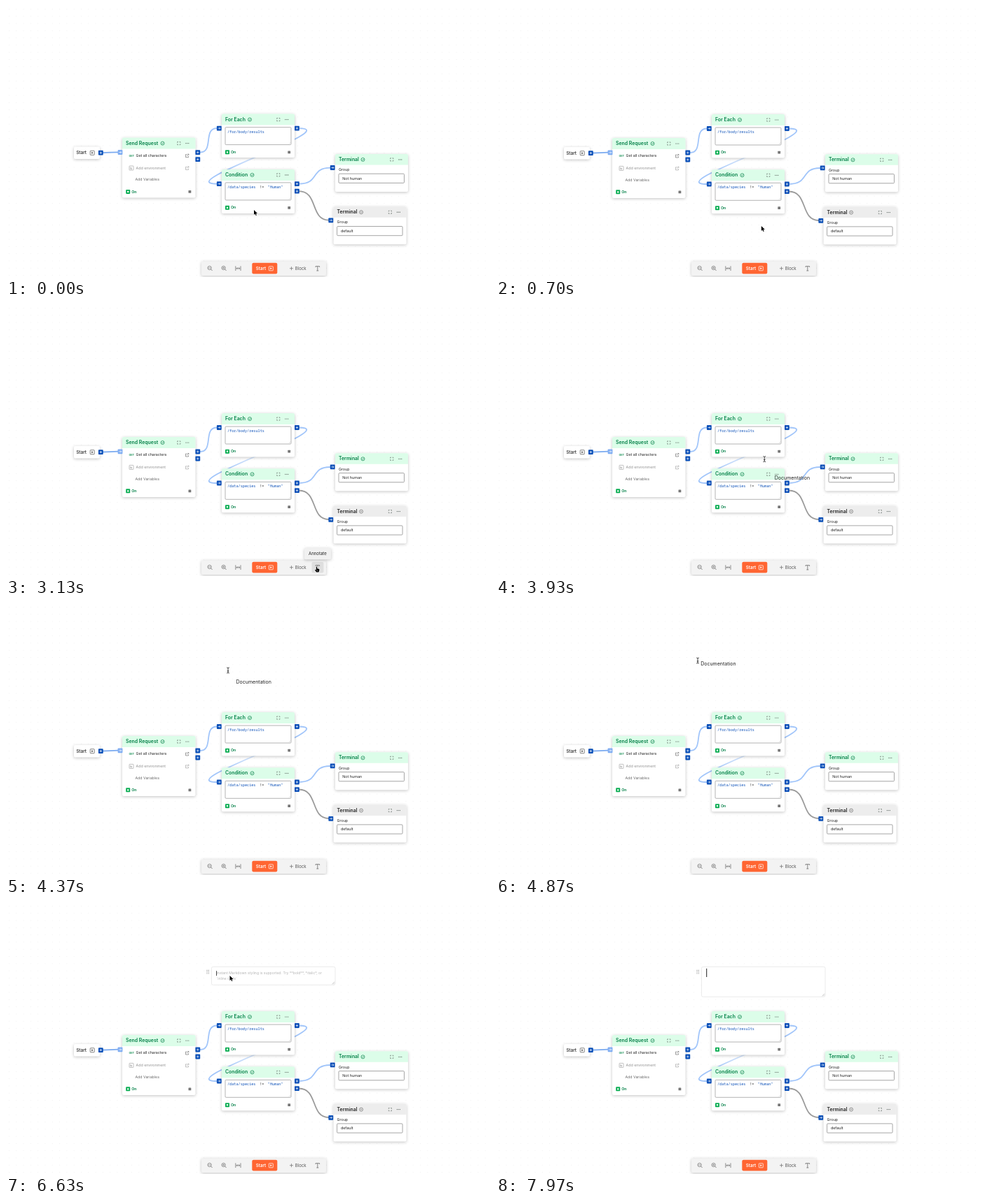
An HTML page with a canvas for the animation above (8 s loop, 691 by 388 pixels).

```html
<!DOCTYPE html>
<html lang="en">
<head>
<meta charset="utf-8">
<title>Flow editor</title>
<style>
html, body { margin: 0; width: 100%; height: 100%; overflow: hidden; background: #fff; }
canvas { display: block; width: 691px; height: 388px; }
</style>
</head>
<body>
<canvas id="stage"></canvas>
<script>
const W = 691, H = 388, LOOP = 8000;
const canvas = document.getElementById('stage');
const ctx = canvas.getContext('2d');
const dpr = window.devicePixelRatio || 1;
canvas.width = W * dpr;
canvas.height = H * dpr;

const SANS = 'Inter, "Open Sans", sans-serif';
const MONO = '"Noto Sans Mono", "DejaVu Sans Mono", monospace';
const GREEN = '#007f46', MINT = '#dcfde9', BLUE = '#0b50b8', LINK = '#a1c5fa';
const INK = '#212121', GRAY = '#6b6b6b';

// Times of the hard changes, in ms
const SETTLE = 400, HAND = 2260, TIP = 2560, PICK = 3380, PLACE = 5420, TYPE = 7700, HEADING = 7860;

// Pointer path: time, x, y
const path = [
  [0, 354, 292], [420, 354, 292], [900, 404, 338], [1350, 441, 371], [1870, 447, 373],
  [2300, 443.5, 374.5], [3400, 443.5, 374.5], [3750, 411, 280], [4170, 343, 141],
  [4370, 317, 95], [4600, 293, 79], [4870, 288, 81], [5120, 288, 88], [5480, 289, 90],
  [5950, 319.5, 104], [8000, 319.5, 104]
];

function slope(i, k) {
  const a = path[i - 1], p = path[i], b = path[i + 1];
  if (!a || !b) return 0;
  const before = p[k] - a[k], after = b[k] - p[k];
  return before * after <= 0 ? 0 : (b[k] - a[k]) / (b[0] - a[0]);
}

function pointerAt(t) {
  let i = 0;
  while (i < path.length - 2 && t > path[i + 1][0]) i++;
  const a = path[i], b = path[i + 1], d = b[0] - a[0];
  const s = Math.max(0, (t - a[0]) / d), s2 = s * s, s3 = s2 * s;
  return [1, 2].map(k =>
    (2 * s3 - 3 * s2 + 1) * a[k] + (s3 - 2 * s2 + s) * d * slope(i, k) +
    (3 * s2 - 2 * s3) * b[k] + (s3 - s2) * d * slope(i + 1, k));
}

function text(str, x, y, size, color = INK, weight = 400, family = SANS) {
  ctx.font = `${weight} ${size}px ${family}`;
  ctx.fillStyle = color;
  ctx.fillText(str, x, y);
}

function box(x, y, w, h, r, fill, line, width = 0.6) {
  ctx.beginPath();
  ctx.roundRect(x, y, w, h, r);
  if (fill) { ctx.fillStyle = fill; ctx.fill(); }
  if (line) { ctx.strokeStyle = line; ctx.lineWidth = width; ctx.stroke(); }
}

function shadowBox(x, y, w, h, r, fill) {
  ctx.save();
  ctx.shadowColor = 'rgba(0,0,0,.24)';
  ctx.shadowBlur = 4 * dpr;
  ctx.shadowOffsetY = dpr;
  box(x, y, w, h, r, fill);
  ctx.restore();
}

// Strokes a list of polylines given as flat coordinates
function lines(color, width, ...parts) {
  ctx.beginPath();
  for (const p of parts) {
    ctx.moveTo(p[0], p[1]);
    for (let i = 2; i < p.length; i += 2) ctx.lineTo(p[i], p[i + 1]);
  }
  ctx.strokeStyle = color;
  ctx.lineWidth = width;
  ctx.stroke();
}

function ring(x, y, r, color, width = 0.7) {
  ctx.beginPath();
  ctx.arc(x, y, r, 0, 7);
  ctx.strokeStyle = color;
  ctx.lineWidth = width;
  ctx.stroke();
}

function dot(x, y, r, color) {
  ctx.beginPath();
  ctx.arc(x, y, r, 0, 7);
  ctx.fillStyle = color;
  ctx.fill();
}

function wire(color, x1, y1, c1, c2, x2, y2) {
  ctx.beginPath();
  ctx.moveTo(x1, y1);
  ctx.bezierCurveTo(c1, y1, c2, y2, x2, y2);
  ctx.strokeStyle = color;
  ctx.lineWidth = 1.8;
  ctx.stroke();
}

function port(x, y, arrow, fill = BLUE) {
  box(x - 3.4, y - 3.4, 6.8, 6.8, 0.8, fill);
  if (arrow) lines('#fff', 0.7, [x - 1.8, y, x + 1.6, y], [x + 0.3, y - 1.4, x + 1.7, y, x + 0.3, y + 1.4]);
  else lines('#fff', 0.7, [x - 1.7, y, x + 1.7, y], [x, y - 1.7, x, y + 1.7]);
}

function playIcon(x, y, color) {
  box(x - 3, y - 3, 6, 6, 0.6, null, color, 0.7);
  ctx.beginPath();
  ctx.moveTo(x - 1, y - 1.5);
  ctx.lineTo(x + 1.5, y);
  ctx.lineTo(x - 1, y + 1.5);
  ctx.fillStyle = color;
  ctx.fill();
}

function expandIcon(x, y) {
  const parts = [];
  for (const sx of [-1, 1]) for (const sy of [-1, 1])
    parts.push([x + sx * 0.8, y + sy * 2.1, x + sx * 2.1, y + sy * 2.1, x + sx * 2.1, y + sy * 0.8]);
  lines('#667069', 0.7, ...parts);
}

function linkIcon(x, y, color) {
  lines(color, 0.65, [x, y - 1.8, x - 2, y - 1.8, x - 2, y + 2.2, x + 2, y + 2.2, x + 2, y + 0.4],
    [x - 0.3, y + 0.4, x + 2.4, y - 2.3], [x + 0.8, y - 2.4, x + 2.4, y - 2.4, x + 2.4, y - 0.8]);
}

function card(x, y, w, h, head, title, titleW, ok = true) {
  const cy = y + 8;
  shadowBox(x, y, w, h, 2, '#fff');
  box(x, y, w, head, [2, 2, 0, 0], ok ? MINT : '#ededed');
  text(title, x + 5, cy, 6.9, ok ? GREEN : INK, 600);
  const ix = x + titleW + 11.5, color = ok ? GREEN : GRAY;
  ring(ix, cy, 2.5, color);
  if (ok) lines(color, 0.7, [ix - 1.1, cy, ix - 0.2, cy + 0.9, ix + 1.3, cy - 0.9]);
  else lines(color, 0.7, [ix - 1.2, cy, ix + 1.2, cy]);
  expandIcon(x + 80.8, cy);
  for (const d of [-2, 0, 2]) dot(x + 92.8 + d, cy, 0.6, '#505a54');
}

function status(x, y) {
  box(x, y - 3, 6, 6, 0.8, '#0cae54');
  box(x + 1.9, y - 1.1, 2.2, 2.2, 0.3, '#fff');
  text('On', x + 8, y, 5.3, GREEN, 600);
  box(x + 89.3, y - 1.9, 3.8, 3.8, 0.5, '#777');
}

function codeBox(x, y) {
  box(x, y, 94, 25, 1.2, '#fff', '#949494', 0.7);
  lines('#aaa', 0.4, [x + 91, y + 24, x + 93.3, y + 21.7]);
}

function terminal(x, y, label, ok) {
  card(x, y, 104, 54, 15.5, 'Terminal', 28, ok);
  text('Group', x + 5, y + 22.6, 5.3);
  box(x + 5, y + 28.3, 93.5, 13.2, 1.2, '#fff', '#808080', 0.7);
  text(label, x + 10.3, y + 35.2, 5.4);
}

function grid() {
  ctx.fillStyle = '#eeeeee';
  for (let y = 4; y < H; y += 10.3)
    for (let x = 4; x < W; x += 10.3) ctx.fillRect(x, y, 0.9, 0.9);
}

function flow() {
  const fade = ctx.createLinearGradient(430, 176, 290, 250);
  fade.addColorStop(0, LINK);
  fade.addColorStop(0.2, LINK);
  fade.addColorStop(0.36, '#e3edfb');
  fade.addColorStop(0.55, '#d5e5fb');
  fade.addColorStop(0.85, LINK);
  fade.addColorStop(1, LINK);
  wire(fade, 418, 175.5, 484, 235, 301, 255);
  wire('#7aaaf0', 138, 210.5, 146, 152, 160, 209.7);
  wire(LINK, 277, 210, 297, 281, 301, 175.5);
  wire(LINK, 418, 255, 448, 434, 463, 232);
  wire('#9b9b9b', 418, 265.5, 446, 434, 461, 307);

  shadowBox(97, 202, 37, 17.5, 2, '#fff');
  text('Start', 100.2, 210.7, 6.4, INK, 500);
  playIcon(123.2, 210.7, '#505050');
  port(135.3, 210.6);

  card(166, 189, 104.5, 86, 16, 'Send Request', 46);
  text('GET', 175.4, 214.8, 3.8, '#0a8a4c', 600);
  text('Get all characters', 185.6, 214.7, 5.25);
  linkIcon(258.5, 214.8, GRAY);
  box(176, 229.4, 6, 6, 0.6, null, '#999', 0.6);
  lines('#999', 0.6, [177.8, 231, 177.8, 233.8, 180, 233.8], [178, 232.4, 180, 232.4]);
  text('Add environment', 185.6, 232.6, 5.25, '#929292');
  linkIcon(258.5, 232.6, '#a0a0a0');
  text('Add Variables', 184.5, 249.3, 5.25, GRAY);
  status(171.2, 266.3);
  port(163, 209.9, true, '#81aef2');
  port(273.8, 210);
  port(273.8, 220);

  card(308, 155, 104, 62.5, 16, 'For Each', 28.5);
  codeBox(313, 174);
  text('/for/body/results', 316, 180.7, 5.2, BLUE, 400, MONO);
  status(313, 209.7);
  port(304.3, 175.5, true);
  port(415.4, 175.5);

  card(308, 234.3, 104, 63, 16, 'Condition', 32);
  codeBox(313, 253.3);
  text('/data/species', 316, 260, 5.2, BLUE, 400, MONO);
  text('!=', 362.2, 260, 5.2, '#333', 400, MONO);
  text('"Human"', 373.8, 260, 5.2, BLUE, 400, MONO);
  status(313, 289.2);
  port(304.3, 255, true);
  port(415.4, 255);
  port(415.4, 265.6);

  terminal(470, 212.3, 'Not human', true);
  port(466.2, 231.9, true);
  terminal(467.6, 287.6, 'default', false);
  port(463.8, 307.3, true);
}

function toolbar(hover) {
  shadowBox(279, 365.5, 178, 20.5, 2, '#f3f3f3');
  if (hover) box(436.5, 368, 17, 15.5, 2, '#dfdfdf');
  for (const x of [290.6, 310.6]) {
    ring(x, 375, 2.6, GRAY, 0.75);
    lines(GRAY, 0.8, [x + 1.9, 376.9, x + 4, 379]);
    lines(GRAY, 0.7, [x - 1.3, 375, x + 1.3, 375]);
  }
  lines(GRAY, 0.7, [310.6, 373.7, 310.6, 376.3]);
  lines(GRAY, 0.75, [327.8, 372.4, 327.8, 379], [335, 372.4, 335, 379], [329, 375.7, 333.8, 375.7],
    [330.4, 374.3, 329, 375.7, 330.4, 377.1], [332.4, 374.3, 333.8, 375.7, 332.4, 377.1]);
  box(351.3, 367.8, 36, 15.7, 2, '#ff6532');
  text('Start', 356.8, 376, 6.1, '#fff', 600);
  playIcon(378.3, 375.8, '#fff');
  lines(GRAY, 0.7, [405, 375.7, 410, 375.7], [407.5, 373.2, 407.5, 378.2]);
  text('Block', 412.7, 376, 6.1, '#555');
  lines(GRAY, 0.8, [442, 374, 442, 372.7, 447.6, 372.7, 447.6, 374], [444.8, 372.7, 444.8, 379],
    [443.3, 379, 446.3, 379]);
}

function tooltip() {
  shadowBox(426, 348, 38.2, 16.3, 2, '#f1f1f1');
  text('Annotate', 432, 356.4, 6.05);
}

function editor(t) {
  const big = t >= HEADING, h = big ? 43 : 26;
  box(293.5, 91.3, 176.5, h, 2, 'rgba(255,255,255,.85)', '#e3e3e3', 0.7);
  for (const x of [287, 289.3]) for (const y of [96.4, 98.6, 100.8]) dot(x, y, 0.65, '#8c8c8c');
  const b = 91.3 + h;
  lines('#999', 0.5, [465.5, b - 1, 469, b - 4.5], [467.3, b - 1, 469, b - 2.7]);
  if (t < TYPE) {
    text('Instant Markdown styling is supported. Try **bold**, *italic*, or', 300.5, 100.9, 5.1, '#b4b4b4');
    text('`inline code`', 300.5, 108.9, 5.1, '#b4b4b4');
  } else if (!big) text('#', 300.5, 100.9, 5.1);
  const start = t >= HEADING ? HEADING : t >= TYPE ? TYPE : PLACE;
  if ((t - start) % 1000 >= 500) return;
  ctx.fillStyle = INK;
  if (big) ctx.fillRect(300.2, 93.8, 1, 12.2);
  else ctx.fillRect(t >= TYPE ? 304 : 300.2, 97.2, 0.8, 7);
}

function shape(points, x, y) {
  ctx.beginPath();
  for (let i = 0; i < points.length; i += 2) ctx.lineTo(x + points[i], y + points[i + 1]);
  ctx.closePath();
  ctx.lineJoin = 'round';
  ctx.strokeStyle = '#fff';
  ctx.lineWidth = 1.4;
  ctx.stroke();
  ctx.fillStyle = '#000';
  ctx.fill();
}

function cursor(kind, x, y) {
  if (kind === 'arrow') {
    shape([0, 0, 0, 7, 1.6, 5.6, 2.7, 8.1, 3.9, 7.6, 2.8, 5.2, 5, 5.1], x, y);
  } else if (kind === 'hand') {
    shape([-0.7, 0, 0.5, 0, 0.7, 2.7, 3, 3.2, 4, 4.1, 3.6, 6.4, 2.9, 8, -0.5, 8, -2.7, 4.8, -2, 4.2, -0.8, 5.2], x, y);
    lines('#fff', 0.35, [0.4 + x, 5 + y, 0.5 + x, 6.8 + y], [1.5 + x, 5 + y, 1.5 + x, 6.8 + y]);
  } else {
    const bar = [[x - 1.8, y - 4, x - 0.5, y - 3.7, x, y - 3, x + 0.5, y - 3.7, x + 1.8, y - 4],
      [x, y - 3, x, y + 3], [x - 1.2, y + 1, x + 1.2, y + 1],
      [x - 1.8, y + 4, x - 0.5, y + 3.7, x, y + 3, x + 0.5, y + 3.7, x + 1.8, y + 4]];
    lines('#fff', 1.6, ...bar);
    lines('#111', 0.8, ...bar);
  }
}

function draw(t) {
  ctx.setTransform(dpr, 0, 0, dpr, 0, 0);
  ctx.textBaseline = 'middle';
  ctx.fillStyle = '#fff';
  ctx.fillRect(0, 0, W, H);
  grid();
  ctx.save();
  if (t < SETTLE) ctx.translate(0, -0.4);
  flow();
  ctx.restore();

  const carrying = t >= PICK && t < PLACE;
  if (t >= PLACE) editor(t);
  toolbar(t >= HAND && t < PICK + 100);
  if (t >= TIP && t < PICK + 100) tooltip();
  if (carrying) {
    // The label trails slightly behind the pointer
    const [lx, ly] = pointerAt(t - 62);
    text('Documentation', lx + 4.2, ly + 5.7, 7);
  }
  if (t >= TYPE) return;
  const [x, y] = pointerAt(t);
  cursor(carrying ? 'beam' : t >= HAND && t < PICK ? 'hand' : 'arrow', x, y);
}

let begin;
function frame(now) {
  begin ??= now;
  draw((now - begin) % LOOP);
  requestAnimationFrame(frame);
}
requestAnimationFrame(frame);
</script>
</body>
</html>
```
